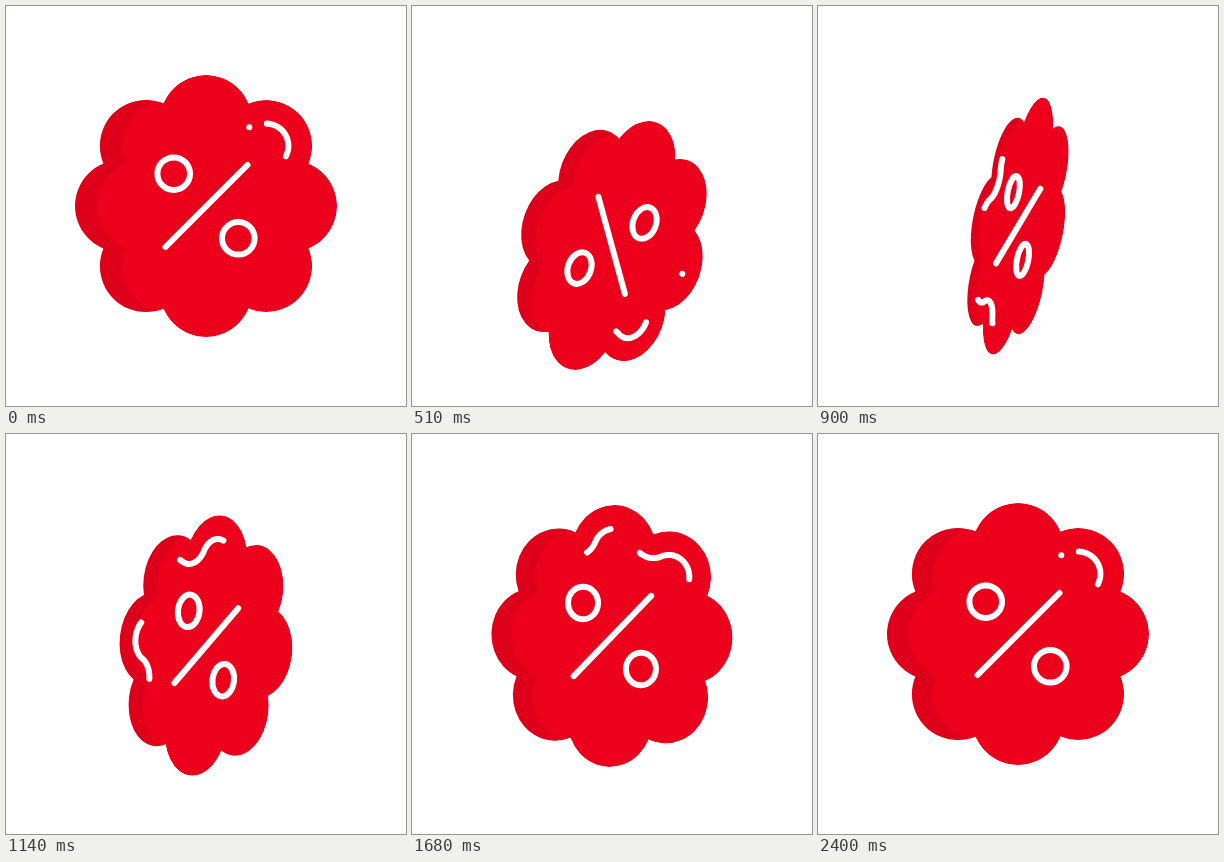
These frames come from a looping animation (400x400 px, 5.43 s). An HTML page with a canvas:

```html
<!DOCTYPE html>
<html lang="en">
<head>
<meta charset="utf-8">
<title>Discount badge</title>
<style>
html, body { margin: 0; width: 100%; height: 100%; overflow: hidden; background: #fff; }
canvas { display: block; width: 400px; height: 400px; }
</style>
</head>
<body>
<canvas id="stage" width="400" height="400"></canvas>
<script>
const ctx = document.getElementById('stage').getContext('2d');
const LOOP = 5430, STEP = 30, END = 2400;
const FRONT = '#ec001c', SHADE = '#de001a';
const RAD = Math.PI / 180;

// Badge geometry, relative to its centre
const RING = 85, LOBE = 46, NOTCH = 111, DEPTH = 22;
const INNER = 22.3, INSET = LOBE - INNER;
const HALF_LOBE = INNER * 67.5 * RAD;
const PERIOD = 2 * HALF_LOBE + INSET * 90 * RAD;

// Motion keys
const TIMES = [0, 270, 510, 900, 1440, 1920, 2400];
const SPIN = [0, 116.4, 225, 290.4, 326, 346, 360];
const TILT = [0, 11, 20, 11.5, 2.8, 0.8, 0];
const DROP = [0, 30, 39.5, 20, 4.5, 1, 0];
const TURN = 8 * PERIOD;
const SHORT_START = [55 - TURN, -613, -536, -341, -113, 13, 55];
const SHORT_END = [55 - TURN, -613, -536, -277, -61, 32, 55];
const LONG_START = [73 - TURN, -593, -466, -168, 2, 59, 73];
const LONG_END = [118 - TURN, -554, -418, -105, 83, 115, 118];

function slope(keys, i) {
  if (i === 0 || i === keys.length - 1) return 0;
  const a = TIMES[i] - TIMES[i - 1], b = TIMES[i + 1] - TIMES[i];
  return ((keys[i] - keys[i - 1]) / a * b + (keys[i + 1] - keys[i]) / b * a) / (a + b);
}

// Smooth cubic through the keys
function track(keys, t) {
  let i = 0;
  while (i < TIMES.length - 2 && t >= TIMES[i + 1]) i++;
  const span = TIMES[i + 1] - TIMES[i];
  const u = (t - TIMES[i]) / span, v = 1 - u;
  return keys[i] * v * v * (1 + 2 * u) + keys[i + 1] * u * u * (3 - 2 * u)
    + span * u * v * (slope(keys, i) * v - slope(keys, i + 1) * u);
}

function polar(r, deg) {
  return [r * Math.cos(deg * RAD), r * Math.sin(deg * RAD)];
}

// Point on the inset scalloped outline, s measured clockwise from the top
function outline(s) {
  const k = Math.round(s / PERIOD), d = s - k * PERIOD;
  const axis = k * 45 - 90, side = Math.sign(d), over = Math.abs(d) - HALF_LOBE;
  const [cx, cy] = over <= 0 ? polar(RING, axis) : polar(NOTCH, axis + side * 22.5);
  const [x, y] = over <= 0
    ? polar(INNER, axis + d / INNER / RAD)
    : polar(INSET, axis + 180 + side * (67.5 - over / INSET / RAD));
  return [cx + x, cy + y];
}

function disc(x, y, r) {
  ctx.moveTo(x + r, y);
  ctx.arc(x, y, r, 0, 2 * Math.PI);
}

function lobes(from, to, shift) {
  for (let k = from; k <= to; k++) {
    const [x, y] = polar(RING, k * 45);
    disc(x + shift, y, LOBE);
  }
}

function fill(color, build) {
  ctx.beginPath();
  build();
  ctx.fillStyle = color;
  ctx.fill();
}

// Shapes follow the pose, line weight does not
function stroke(build) {
  ctx.beginPath();
  build();
  ctx.save();
  ctx.resetTransform();
  ctx.stroke();
  ctx.restore();
}

function dash(from, to) {
  const n = Math.max(1, Math.ceil((to - from) / 2));
  stroke(() => {
    ctx.moveTo(...outline(from));
    for (let i = 1; i <= n; i++) {
      const [x, y] = outline(from + (to - from) * i / n);
      ctx.lineTo(x + 0.01, y);
    }
  });
}

function draw(t) {
  const width = Math.cos(track(SPIN, t) * RAD);
  ctx.resetTransform();
  ctx.fillStyle = '#fff';
  ctx.fillRect(0, 0, 400, 400);
  ctx.strokeStyle = '#fff';
  ctx.lineWidth = 6;
  ctx.lineCap = ctx.lineJoin = 'round';

  ctx.translate(200, 200 + track(DROP, t));
  ctx.rotate(track(TILT, t) * RAD);
  ctx.scale(Math.max(Math.abs(width), 0.01), 1);

  fill(SHADE, () => lobes(3, 5, 0));
  ctx.save();
  ctx.beginPath();
  lobes(0, 7, 0);
  disc(0, 0, 70);
  ctx.clip();
  fill(FRONT, () => {
    lobes(-2, 2, 0);
    lobes(3, 5, DEPTH);
    disc(0, 0, 70);
  });
  ctx.restore();

  const tail = track(SHORT_START, t);
  dash(tail, Math.max(tail, track(SHORT_END, t)));
  dash(track(LONG_START, t), track(LONG_END, t));

  // The percent sign shows mirrored while the badge faces away
  if (width < 0) ctx.scale(-1, 1);
  stroke(() => {
    ctx.moveTo(-40.5, 41);
    ctx.lineTo(41.5, -41);
    disc(-32.3, -32.3, 16.3);
    disc(32.3, 32.3, 16.3);
  });
}

const begin = performance.now();

function tick() {
  const t = (performance.now() - begin) % LOOP;
  draw(Math.min(Math.floor(t / STEP) * STEP, END));
  requestAnimationFrame(tick);
}

tick();
</script>
</body>
</html>
```
